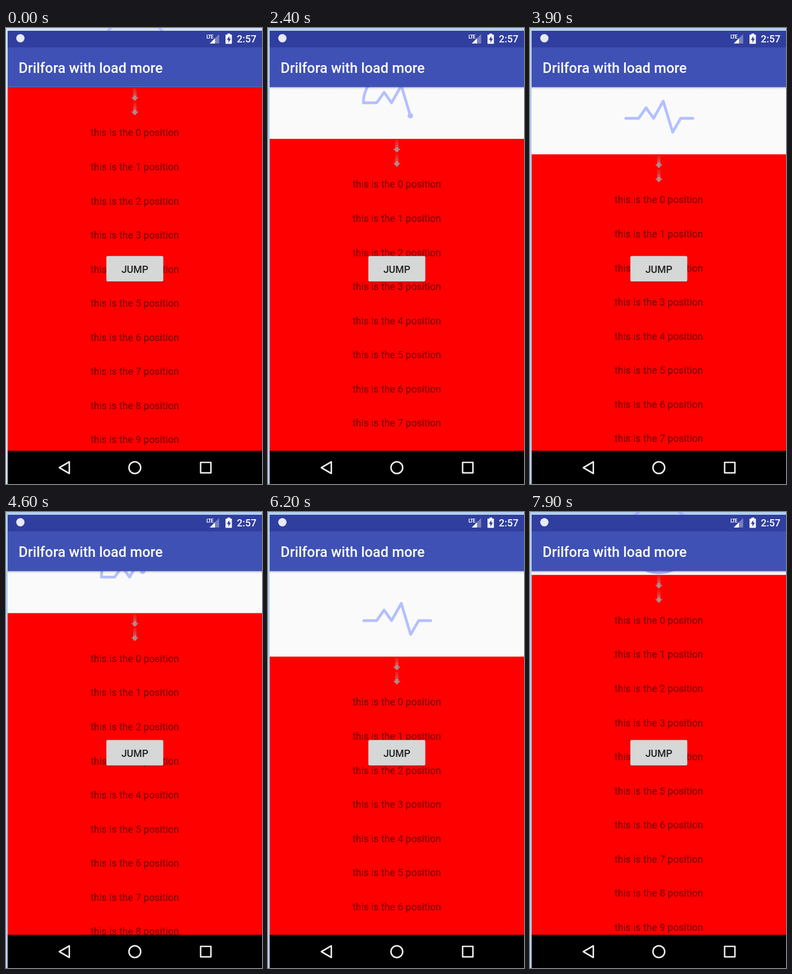
Write an HTML page that moves like this. It is 463 px wide and 823 px high and loops after 8000 ms.

```html
<!DOCTYPE html>
<html lang="en">
<head>
<meta charset="utf-8">
<title>Pull to refresh</title>
<style>
  html, body { margin: 0; width: 100%; height: 100%; overflow: hidden; }
  svg { display: block; width: 463px; height: 823px; }
  text { font-family: Roboto, Arial, sans-serif; font-size: 17.9px; }
  .bold { font-weight: 500; }
  .rows text { text-anchor: middle; fill: #000; fill-opacity: .56; }
  .nav { fill: none; stroke: #ececec; stroke-width: 2.7; stroke-linejoin: round; }
  .loader { fill: none; stroke: #b3c0ff; stroke-width: 5; stroke-linecap: round; stroke-linejoin: round; }
</style>
</head>
<body>
<svg viewBox="0 0 463 823">
  <defs>
    <linearGradient id="shade" x2="0" y2="1">
      <stop offset="0" stop-color="#000" stop-opacity=".28"/>
      <stop offset=".4" stop-color="#000" stop-opacity=".09"/>
      <stop offset="1" stop-color="#000" stop-opacity="0"/>
    </linearGradient>
    <g id="arrow" fill="#b08a8a">
      <rect x="-3" y="2" width="6" height="2" opacity=".3"/>
      <rect x="-3" y="5" width="6" height="2" opacity=".42"/>
      <rect x="-3" y="8" width="6" height="2" opacity=".55"/>
      <rect x="-3" y="11" width="6" height="2.3" opacity=".75"/>
      <path d="M-3 14.3H3V18H6.5L0 25L-6.5 18H-3Z"/>
    </g>
  </defs>

  <rect id="desk" width="463" height="823"/>
  <rect x="3" y="106" width="460" height="657" fill="#fafafa"/>

  <g id="sheet">
    <path id="loader" class="loader"/>
    <circle id="head" r="5" fill="#b3c0ff"/>
    <rect x="3" y="107" width="460" height="700" fill="#f00"/>
    <use href="#arrow" x="233" y="107"/>
    <use href="#arrow" x="233" y="132.7"/>
    <g id="rows" class="rows"></g>
  </g>

  <rect x="3" y="106.5" width="460" height="5" fill="url(#shade)"/>

  <rect x="182" y="413" width="103" height="46.5" rx="3" fill="#000" opacity=".22"/>
  <rect x="181.5" y="411.5" width="103" height="46" rx="2.5" fill="#d6d7d7"/>
  <text class="bold" x="233" y="441.7" text-anchor="middle" fill="#212121">JUMP</text>

  <rect x="3" y="5" width="460" height="30" fill="#303f9f"/>
  <rect x="3" y="35" width="460" height="71.7" fill="#3f51b5"/>
  <text class="bold" x="22.8" y="80.6" style="font-size:25.56px" fill="#fff">Drilfora with load more</text>
  <circle cx="26" cy="18.5" r="7.5" fill="#e8eaf6"/>
  <text x="362.5" y="18.6" style="font-size:9px;font-weight:700;letter-spacing:-.9px" fill="#fff">LTE</text>
  <path d="M385.5 11V28H368.5Z" fill="#7780bf"/>
  <path d="M378 18.5V28H368.5Z" fill="#fff"/>
  <path d="M400.5 10H405.5V12H408.5V28.5H397V12H400.5Z" fill="#fff"/>
  <path d="M404 14.5L399.5 21.5H402.3V26.5L406.8 19.3H404Z" fill="#303f9f"/>
  <text class="bold" x="417.6" y="26.3" fill="#fff">2:57</text>

  <rect x="3" y="763" width="460" height="60"/>
  <g class="nav">
    <path d="M96.5 793.5L114.5 783V804Z"/>
    <circle cx="233" cy="793.5" r="10.6"/>
    <rect x="352" y="784" width="18.6" height="18.8"/>
  </g>
</svg>
<script>
const $ = id => document.getElementById(id);
const LOOP = 8000, STEP = 100, R = 61, RING = 2 * Math.PI * R;

// [time, pull distance]
const pull = [
  [0, 0], [1300, 0], [1400, 4], [1700, 29], [3000, 148], [3100, 157], [3200, 160], [3300, 160],
  [3900, 121], [4700, 69], [4800, 69], [5400, 107.5], [5600, 121], [5700, 121],
  [6200, 154], [6500, 165], [6600, 160], [6800, 130], [7150, 130],
  [7300, 95], [7500, 52], [7700, 20], [7900, 6.5], [8000, 6.5]
];
// [time, change from pulse line to ring]
const morph = [[0, 0], [6600, 0], [7200, 1], [8000, 1]];

function at(table, t) {
  const i = table.findIndex(k => k[0] > t);
  const [t0, a] = table[i - 1], [t1, b] = table[i];
  return a + (b - a) * (t - t0) / (t1 - t0);
}

// One track: a ring ending on its left, then the pulse line
const track = $("loader");
track.setAttribute("d",
  `M172.5 42a${R} ${R} 0 0 0 ${2 * R} 0a${R} ${R} 0 0 0 ${-2 * R} 0` +
  "h24l13.5-19 13.5 19 17.5-31 17 56 14.5-25h22");
const total = track.getTotalLength();
const pulse = total - RING;

for (let i = 0; i < 11; i++) {
  const row = document.createElementNS("http://www.w3.org/2000/svg", "text");
  row.setAttribute("x", 233);
  row.setAttribute("y", 195.4 + i * 61.55);
  row.textContent = `this is the ${i} position`;
  $("rows").append(row);
}

function draw(time) {
  const t = Math.floor(time % LOOP / STEP) * STEP;
  const y = at(pull, t), m = at(morph, t);
  const shift = t < 6600 ? Math.max(0, (119.5 - y) * 2) : 0;
  const start = (RING - shift) * (1 - m);
  const end = total - shift - pulse * m;

  $("sheet").setAttribute("transform", `translate(0 ${y})`);
  $("desk").setAttribute("fill", t < 1200 ? "#cfe3f4" : "#b4d0ee");
  track.setAttribute("stroke-dasharray", `${end - start} 2000`);
  track.setAttribute("stroke-dashoffset", -start);
  track.style.stroke = m ? "#a5b1fa" : "";

  const tip = track.getPointAtLength(end);
  $("head").setAttribute("cx", tip.x);
  $("head").setAttribute("cy", tip.y);
  $("head").setAttribute("visibility", shift > 0 ? "visible" : "hidden");
}

const begin = performance.now();
function tick() {
  draw(performance.now() - begin);
  requestAnimationFrame(tick);
}
tick();
</script>
</body>
</html>
```
